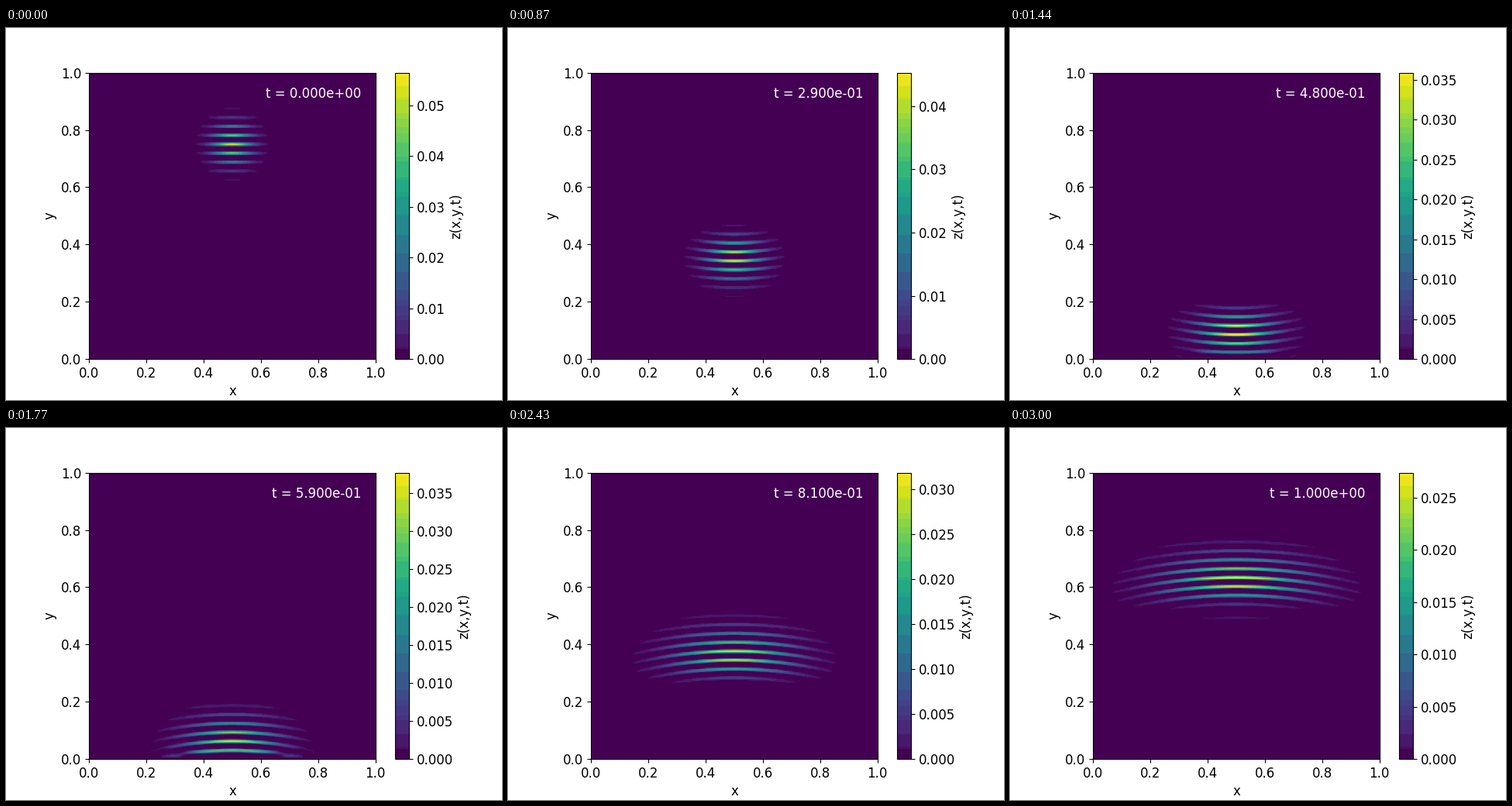
A matplotlib script that plays this animation: 640x480 px, repeating every 3.03 s.

```python
import numpy as np
import matplotlib.pyplot as plt
from matplotlib.animation import FuncAnimation
from matplotlib.colors import ListedColormap

FRAMES, INTERVAL = 101, 30
FONT = 12

# Wave packet in a closed unit box
N = 200
H = 1 / N
DT = 2.5e-5
STEPS = 2  # time steps per frame
SIGMA, XC, YC, P = 0.05, 0.5, 0.75, 200


def initial_packet():
    s = np.arange(1, N) * H
    gx = np.exp(-(s - XC) ** 2 / (2 * SIGMA ** 2))
    gy = np.exp(-(s - YC) ** 2 / (2 * SIGMA ** 2) - 1j * P * (s - YC))
    u = np.outer(gy, gx)
    return u / np.sqrt((np.abs(u) ** 2).sum())


# Sine modes diagonalise the discrete Laplacian, so Crank-Nicolson
# becomes a pure phase advance of each mode.
m = np.arange(1, N)
MODES = np.sqrt(2 / N) * np.sin(np.pi * np.outer(m, m) / N)
LAM = 4 / H ** 2 * np.sin(np.pi * m / (2 * N)) ** 2
PHASE = 2 * np.arctan((LAM[:, None] + LAM[None, :]) * DT / 2)
COEF = MODES @ initial_packet() @ MODES


def field(i):
    u = MODES @ (COEF * np.exp(-1j * PHASE * STEPS * i)) @ MODES
    return np.pad(u.real, 1)


def banded_viridis():
    """Viridis reduced to flat bands of similar colours."""
    rgb = plt.get_cmap("viridis")(np.arange(256))[:, :3]
    r, g, b = (rgb * 255).astype(int).T
    key = (r // 32) * 256 + (g // 16) * 16 + b // 32
    out = np.array([rgb[key == k].mean(axis=0) for k in key])
    out[key == key[0]] = rgb[0]
    return ListedColormap(out)


fig, ax = plt.subplots(figsize=(6.4, 4.8), dpi=100)
z0 = field(0)
img = ax.imshow(z0, extent=[0, 1, 0, 1], origin="lower",
                cmap=banded_viridis(), vmin=0, vmax=z0.max())
ax.set_xlabel("x", fontsize=FONT)
ax.set_ylabel("y", fontsize=FONT)
ax.tick_params(labelsize=FONT)

cbar = fig.colorbar(img, ax=ax)
cbar.set_label("z(x,y,t)", fontsize=FONT)
cbar.ax.tick_params(labelsize=FONT)

clock = ax.text(0.95, 0.95, "", color="white", fontsize=FONT,
                ha="right", va="top")


def update(i):
    z = field(i)
    img.set_data(z)
    img.set_clim(0, z.max())
    clock.set_text(f"t = {i / 100:.3e}")
    return img, clock


anim = FuncAnimation(fig, update, frames=FRAMES, interval=INTERVAL,
                     repeat=True, repeat_delay=0, blit=False)
plt.show()
```
